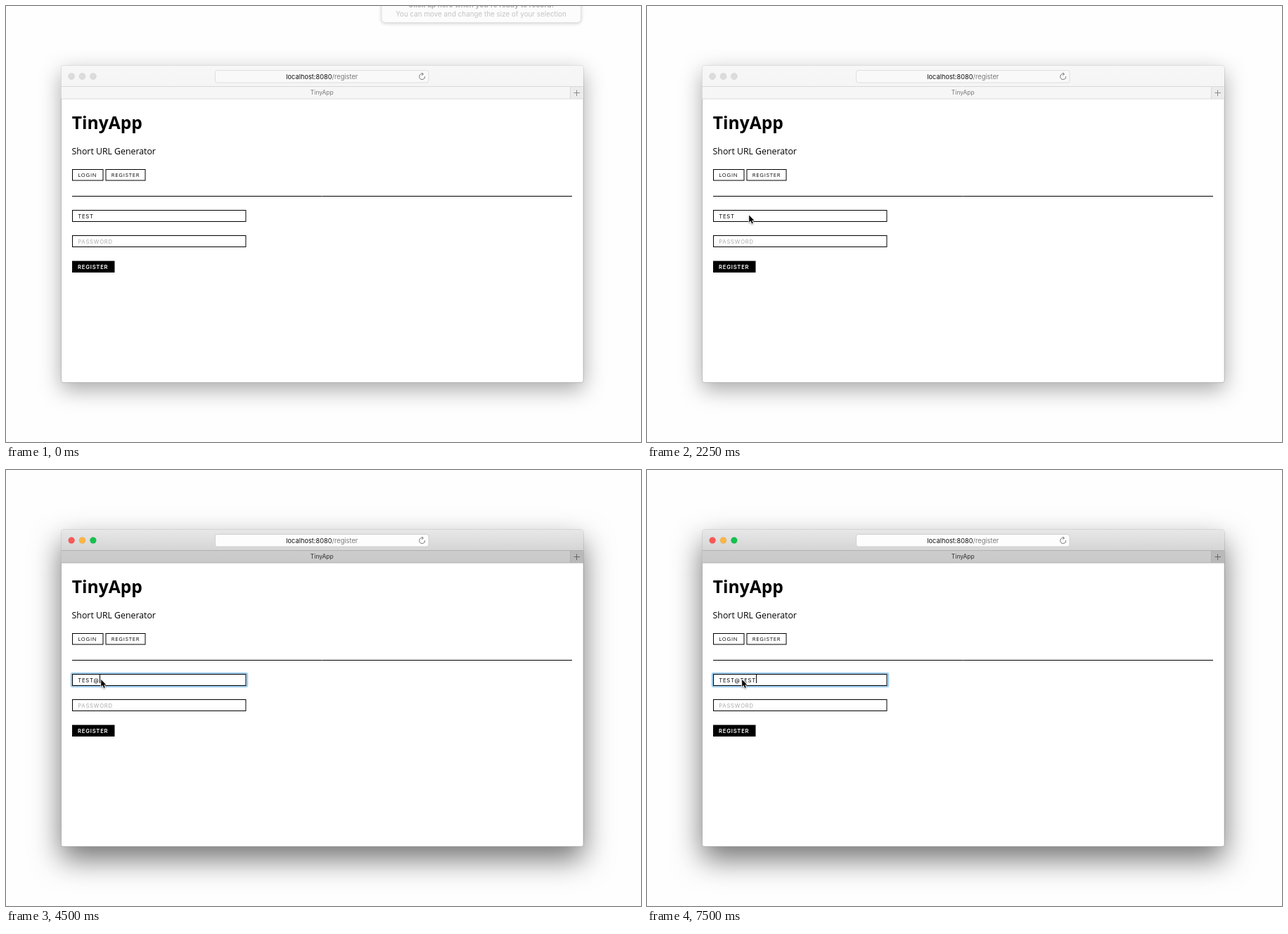
These frames come from a looping animation (903 by 620 pixels, 8 s). An HTML page with a canvas:

```html
<!DOCTYPE html>
<html lang="en">
<head>
<meta charset="utf-8">
<title>Register form</title>
<style>
  html, body { margin: 0; width: 100%; height: 100%; overflow: hidden; background: #fefefe; }
  canvas { display: block; }
</style>
</head>
<body>
<canvas id="stage" width="903" height="620"></canvas>
<script>
const ctx = document.getElementById('stage').getContext('2d');
const LOOP = 8000;
const UI = 'Inter, Roboto, sans-serif';
const PAGE = '"Open Sans", "Noto Sans", sans-serif';

// [start ms, tip x, tip y]
const POINTER = [
  [1000, 457.5, 198.5], [1250, 441.5, 204.5], [1500, 218.5, 297.5],
  [1750, 185.5, 297.5], [2000, 149.5, 296.5], [2250, 145.2, 297.5],
  [2750, 138.5, 298], [3000, 135.2, 298]
];
// [start ms, typed text, caret x or 0 when hidden]
const TYPING = [
  [0, 'TEST', 0], [2500, 'TEST', 124], [3000, 'TEST', 0], [3500, 'TEST', 124],
  [4000, 'TEST', 0], [4500, 'TEST@', 133], [5000, 'TEST@', 0],
  [5500, 'TEST@T', 138], [5750, 'TEST@TE', 144], [6250, 'TEST@TE', 0],
  [6750, 'TEST@TES', 150], [7250, 'TEST@TES', 0], [7500, 'TEST@TEST', 155]
];

const INACTIVE = {
  shadow: [10, 31, .34], bar: ['#f7f7f7', '#f5f5f5'], tab: ['#f6f6f6', '#f6f6f6'],
  line: '#d9d9d9', plus: '#ececec', plusInk: '#8a8a8a', field: '#f9f9f9',
  fieldLine: '#dedede', tabInk: '#7b7b7b', dots: ['#dcdcdc', '#dcdcdc', '#dcdcdc'], dotLine: '#d2d2d2'
};
const ACTIVE = {
  shadow: [18, 41, .55], bar: ['#e8e8e8', '#d5d5d5'], tab: ['#cdcdcd', '#c9c9c9'],
  line: '#b0b0b0', plus: '#b9b9b9', plusInk: '#666', field: '#fdfdfd',
  fieldLine: '#cfcfcf', tabInk: '#333', dots: ['#fc5753', '#fdb541', '#12c24c'], dotLine: 'rgba(0,0,0,.1)'
};

const at = (steps, t) => steps.filter(s => s[0] <= t).pop();

function rect(x, y, w, h, fill) {
  ctx.fillStyle = fill;
  ctx.fillRect(x, y, w, h);
}

function frame(x, y, w, h, color = '#000') {
  ctx.strokeStyle = color;
  ctx.lineWidth = 1;
  ctx.strokeRect(x, y, w, h);
}

function rounded(x, y, w, h, r) {
  ctx.beginPath();
  ctx.roundRect(x, y, w, h, r);
}

function line(x1, y1, x2, y2, color) {
  ctx.beginPath();
  ctx.moveTo(x1, y1);
  ctx.lineTo(x2, y2);
  ctx.strokeStyle = color;
  ctx.lineWidth = 1;
  ctx.stroke();
}

function text(str, x, y, font, color = '#000', spacing = 0, align = 'left') {
  ctx.font = font;
  ctx.letterSpacing = spacing + 'px';
  ctx.textAlign = align;
  ctx.fillStyle = color;
  ctx.fillText(str, x, y);
}

function shade(y, h, [top, bottom]) {
  const g = ctx.createLinearGradient(0, y, 0, y + h);
  g.addColorStop(0, top);
  g.addColorStop(1, bottom);
  rect(78, y, 743, h, g);
}

function shadowed(dy, blur, alpha, fill) {
  ctx.save();
  ctx.shadowOffsetY = dy;
  ctx.shadowBlur = blur;
  ctx.shadowColor = `rgba(0,0,0,${alpha})`;
  ctx.fillStyle = fill;
  ctx.fill();
  ctx.restore();
}

function drawTip() {
  rounded(534, -20, 283.5, 43.5, 5);
  shadowed(1, 5, .22, '#fcfcfc');
  ctx.strokeStyle = '#e2e2e2';
  ctx.lineWidth = 1;
  ctx.stroke();
  text("Click up here when you're ready to record.", 675.5, 2, `bold 10px ${UI}`, '#b2b2b2', 0, 'center');
  text('You can move and change the size of your selection', 675.5, 14.7, `9.85px ${UI}`, '#c3c3c3', 0, 'center');
}

function drawReload(x, y) {
  ctx.strokeStyle = '#666';
  ctx.lineWidth = .9;
  ctx.beginPath();
  ctx.arc(x, y, 3.9, -.1, Math.PI * 1.62);
  ctx.stroke();
  ctx.beginPath();
  ctx.moveTo(x - .6, y - 5.6);
  ctx.lineTo(x + 1.8, y - 3.7);
  ctx.lineTo(x - .4, y - 1.6);
  ctx.stroke();
}

function drawAddress() {
  const host = 'localhost:8080', path = '/register', font = `9.25px ${UI}`;
  ctx.font = font;
  ctx.letterSpacing = '0px';
  const hostW = ctx.measureText(host).width;
  const x = 449.3 - (hostW + ctx.measureText(path).width) / 2;
  text(host, x, 103.7, font, '#111');
  text(path, x + hostW, 103.7, font, '#777');
}

function drawWindow(look) {
  rounded(78.5, 84.5, 742.5, 451, [4, 4, 3, 3]);
  shadowed(...look.shadow, '#fff');
  ctx.strokeStyle = 'rgba(0,0,0,.2)';
  ctx.lineWidth = 1;
  ctx.stroke();

  ctx.save();
  ctx.clip();
  shade(84, 30, look.bar);
  shade(114, 18, look.tab);
  rect(802, 114, 19, 18, look.plus);
  line(78, 114.5, 821, 114.5, look.line);
  line(78, 132, 821, 132, look.line);
  line(802.5, 114, 802.5, 132, look.line);
  ctx.restore();

  line(807.5, 123.5, 816, 123.5, look.plusInk);
  line(811.5, 119.5, 811.5, 128, look.plusInk);

  look.dots.forEach((color, i) => {
    ctx.beginPath();
    ctx.arc(93.1 + i * 15.4, 100, 4.5, 0, 7);
    ctx.fillStyle = color;
    ctx.fill();
    ctx.strokeStyle = look.dotLine;
    ctx.lineWidth = .6;
    ctx.stroke();
  });

  rounded(297.5, 91.5, 303.5, 17.5, 3);
  ctx.fillStyle = look.field;
  ctx.fill();
  ctx.strokeStyle = look.fieldLine;
  ctx.lineWidth = 1;
  ctx.stroke();
  drawAddress();
  drawReload(591.7, 100.5);
  text('TinyApp', 449.3, 126.3, `8.5px ${UI}`, look.tabInk, 0, 'center');
}

function drawPage(t, focused) {
  const small = `7.7px ${PAGE}`, field = `7.7px ${UI}`;
  text('TinyApp', 93.8, 174.5, `bold 24.6px ${PAGE}`);
  text('Short URL Generator', 93.6, 211.3, `12.32px ${PAGE}`);

  frame(94.5, 232.5, 43.5, 15.5);
  text('LOGIN', 102.2, 243, small, '#000', .77);
  frame(142, 232.5, 56, 15.5);
  text('REGISTER', 149.8, 243, small, '#000', .77);
  line(94, 270.5, 805, 270.5, '#000');

  if (focused) {
    rounded(93, 289, 250, 19, 2);
    ctx.strokeStyle = 'rgba(100,175,230,.6)';
    ctx.lineWidth = 2.6;
    ctx.stroke();
  }
  rect(94, 290, 247, 16, '#fff');
  frame(94.5, 290.5, 246.5, 16);
  const [, typed, caret] = at(TYPING, t);
  text(typed, 102.2, 301.6, field, '#000', .77);
  if (caret) rect(caret, 291, 1, 12, '#000');

  frame(94.5, 326.5, 246.5, 16);
  text('PASSWORD', 102.2, 337.6, field, '#a9a9a9', .77);

  rect(94, 362.5, 60.5, 16.5, '#000');
  text('REGISTER', 102, 373.8, `600 7.7px ${UI}`, '#fff', .77);
}

function drawPointer(x, y) {
  const shape = [[0, 0], [0, 10.2], [2.3, 8.1], [3.9, 11.9], [5.6, 11.2], [4, 7.5], [7.2, 7.4]];
  ctx.save();
  ctx.translate(x, y);
  ctx.beginPath();
  shape.forEach(p => ctx.lineTo(...p));
  ctx.closePath();
  ctx.lineJoin = 'round';
  ctx.strokeStyle = '#fff';
  ctx.lineWidth = 1.7;
  ctx.shadowColor = 'rgba(0,0,0,.35)';
  ctx.shadowBlur = 2;
  ctx.shadowOffsetY = 1;
  ctx.stroke();
  ctx.shadowColor = 'transparent';
  ctx.fillStyle = '#000';
  ctx.fill();
  ctx.restore();
}

function draw(now) {
  const t = now % LOOP;
  const focused = t >= 2500;
  rect(0, 0, 903, 620, '#fefefe');
  if (t < 250) drawTip();
  drawWindow(focused ? ACTIVE : INACTIVE);
  drawPage(t, focused);
  const tip = at(POINTER, t);
  if (tip) drawPointer(tip[1], tip[2]);
}

let start;
function tick(now) {
  start ??= now;
  draw(now - start);
  requestAnimationFrame(tick);
}
requestAnimationFrame(tick);
</script>
</body>
</html>
```
